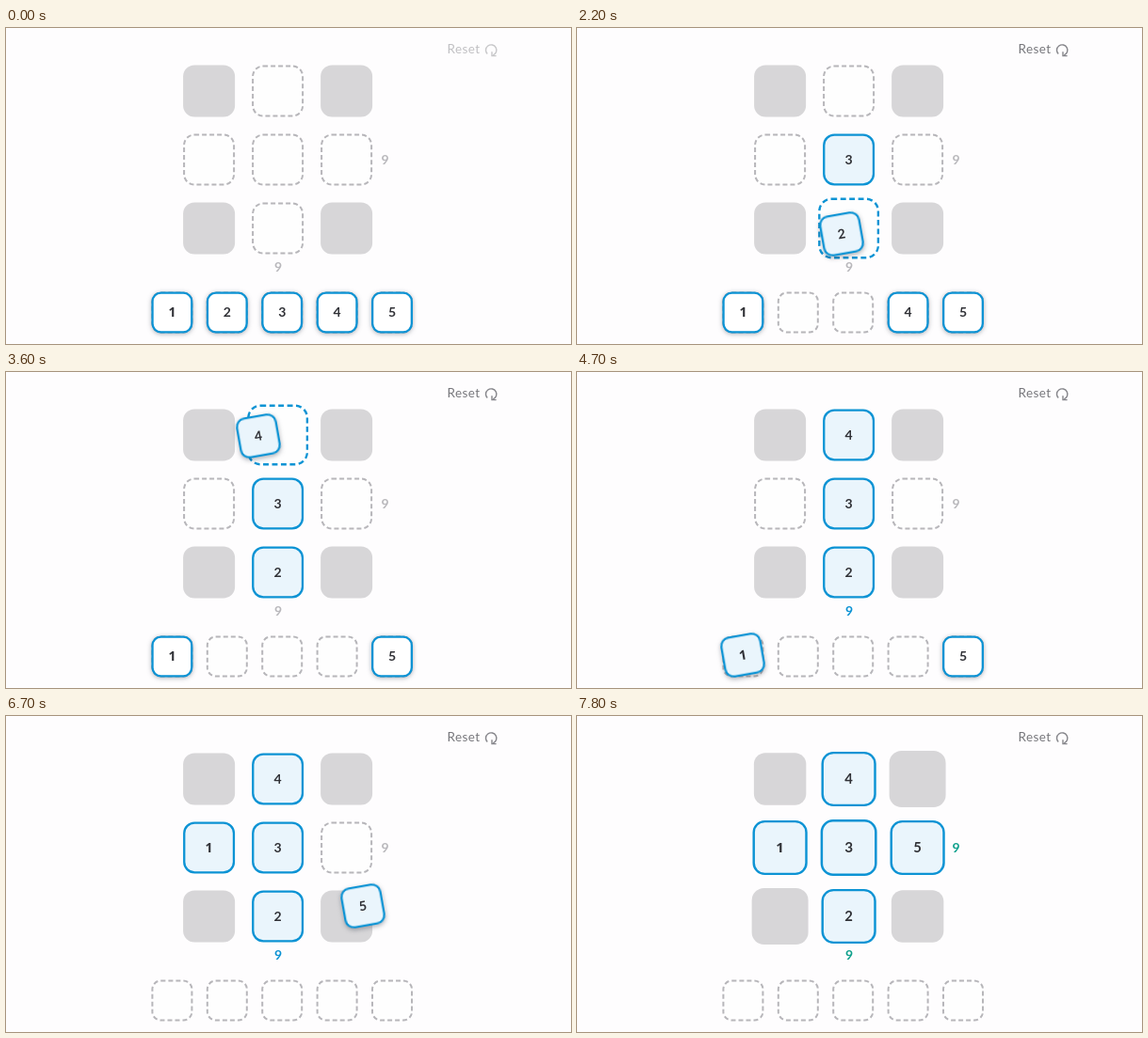
An HTML page that plays this animation: 600 px wide and 336 px high, repeating every 7.9 s.

```html
<!DOCTYPE html>
<html lang="en">
<head>
<meta charset="utf-8">
<title>Number cross puzzle</title>
<style>
  html, body { margin: 0; width: 100%; height: 100%; overflow: hidden; background: #fefdfe; }
  svg { display: block; width: 600px; height: 336px; }
  text { font: 700 14px Lato, sans-serif; text-anchor: middle; }
  .block { fill: #d7d6d8; }
  .slot { fill: #fefefe; stroke: #b7b6ba; stroke-width: 2; stroke-dasharray: 5 3; }
  .slot.hover { stroke: #0c93d4; }
  .tile rect { fill: #fff; stroke: #0c93d4; stroke-width: 2.3; }
  .tile.active rect { fill: #eaf5fc; }
  .tile text { fill: #303136; }
  .tile .one { font-family: "Open Sans", sans-serif; }
  #reset text { font-weight: 400; font-size: 13.5px; letter-spacing: .4px; text-anchor: start; fill: #77777c; }
  #reset path { fill: none; stroke: #85858a; stroke-width: 1.4; }
</style>
</head>
<body>
<svg id="stage" viewBox="0 0 600 336">
  <g id="reset">
    <text x="468.5" y="27">Reset</text>
    <path d="M511.2 27.6A5.7 5.7 0 1 1 517.2 28.9M516 25.2V29.6H520.6"/>
  </g>
</svg>
<script>
const LOOP = 7900, STEP = 100, SETTLE_TILT = -10;
const CELL = 55, TILE = 44;
const GRAY = '#b9b8bc', BLUE = '#0c93d4', GREEN = '#0fa08c';
const stage = document.getElementById('stage');
const reset = document.getElementById('reset');

// Each path point is [time, x, y]; the tile then glides to its cell from "drop" to "rest".
const moves = {
  3: { cell: 4, drop: 900, rest: 1200,
       path: [[500, 293, 301], [600, 294, 278], [700, 297, 210], [800, 297, 155], [900, 291, 145]] },
  2: { cell: 7, drop: 2400, rest: 2700,
       path: [[1700, 235, 301], [1900, 239, 285], [2100, 272, 235], [2200, 281, 219], [2400, 288, 213]] },
  4: { cell: 1, drop: 3800, rest: 4100,
       path: [[3000, 352, 301], [3100, 349, 290], [3300, 325, 205], [3500, 278, 95], [3600, 268, 68], [3800, 281, 67]] },
  1: { cell: 3, drop: 5600, rest: 6000,
       path: [[4700, 176, 301], [4900, 190, 270], [5100, 235, 195], [5300, 278, 125], [5400, 285.5, 115], [5600, 250, 130]] },
  5: { cell: 5, drop: 7000, rest: 7300,
       path: [[6300, 410, 301], [6400, 410, 297], [6500, 405, 270], [6700, 379, 202], [6800, 368, 165], [7000, 362, 142]] }
};

function add(parent, tag, attrs = {}, label) {
  const el = document.createElementNS('http://www.w3.org/2000/svg', tag);
  for (const key in attrs) el.setAttribute(key, attrs[key]);
  if (label) el.textContent = label;
  return parent.appendChild(el);
}

function sizeBox(el, size, radius) {
  const attrs = { x: -size / 2, y: -size / 2, width: size, height: size, rx: radius };
  for (const key in attrs) el.setAttribute(key, attrs[key]);
  return el;
}

const mix = (a, b, p) => a + (b - a) * p;
const clamp = p => Math.max(0, Math.min(1, p));
const place = (el, x, y, scale = 1, tilt = 0) =>
  el.setAttribute('transform', `translate(${x} ${y}) rotate(${tilt}) scale(${scale})`);

const cells = Array.from({ length: 9 }, (_, i) => {
  const col = i % 3, row = Math.floor(i / 3);
  const open = i % 2 === 1 || i === 4;
  const el = add(stage, 'rect', { class: open ? 'slot' : 'block' });
  sizeBox(el, open ? CELL - 2 : CELL, open ? 11 : 12);
  return { el, open, x: 215.6 + col * 73, y: 67 + row * 73, diagonal: col + row };
});

const rowSum = add(stage, 'text', { x: 402.5, y: 145 }, '9');
const columnSum = add(stage, 'text', { x: 289, y: 258.5 }, '9');

const trayX = n => 176.4 + (n - 1) * 58.4;
const trayY = 302.5;
for (let n = 1; n <= 5; n++) {
  place(sizeBox(add(stage, 'rect', { class: 'slot' }), TILE - 2, 9), trayX(n), trayY);
}

const tiles = [1, 2, 3, 4, 5].map(n => {
  const el = add(stage, 'g', { class: 'tile' });
  const box = add(el, 'rect');
  add(el, 'text', { y: 4.9, class: n === 1 ? 'one' : '' }, String(n));
  return { n, el, box, ...moves[n] };
});

function along(path, t) {
  let i = 1;
  while (i < path.length - 1 && t > path[i][0]) i++;
  const [t0, x0, y0] = path[i - 1], [t1, x1, y1] = path[i];
  const p = clamp((t - t0) / (t1 - t0));
  return [mix(x0, x1, p), mix(y0, y1, p)];
}

// Diagonal wave that runs over the board once it is solved.
function pulse(diagonal, t) {
  const p = clamp((t - 7350 - diagonal * 100) / 500);
  return 1 + 0.09 * Math.sin(Math.PI * p) ** 2;
}

function drawTile(tile, t) {
  const { el, box, path, drop, rest } = tile;
  const picked = t >= path[0][0];
  const target = cells[tile.cell];
  const p = 1 - (1 - clamp((t - drop) / (rest - drop))) ** 3;
  let [x, y] = picked ? along(path, t) : [trayX(tile.n), trayY];
  const dragged = picked && t < drop;
  const spot = dragged && cells.find((c, i) => c.open && Math.abs(x - c.x) < CELL / 2 &&
    Math.abs(y - c.y) < CELL / 2 && !tiles.some(o => o.cell === i && t >= o.drop));
  x = mix(x, target.x, p);
  y = mix(y, target.y, p);
  el.classList.toggle('active', picked);
  place(el, x, y, pulse(target.diagonal, t), picked ? SETTLE_TILT * (1 - p) : 0);
  sizeBox(box, mix(TILE, CELL, p) - 2.3, mix(9, 11, p));
  box.style.filter = p < 1
    ? `drop-shadow(0 ${picked ? 2 : 1.5}px 2.5px rgba(50, 55, 70, ${0.38 * (1 - p)}))` : 'none';
  if (picked && t < rest && el !== stage.lastChild) stage.appendChild(el);
  return spot;
}

function draw(t) {
  const spots = tiles.map(tile => drawTile(tile, t));
  cells.forEach((cell, i) => {
    const hover = spots.includes(cell);
    cell.el.classList.toggle('hover', hover);
    cell.el.style.display = tiles.some(o => o.cell === i && t >= o.rest) ? 'none' : '';
    place(cell.el, cell.x, cell.y, hover ? 1.18 : pulse(cell.diagonal, t));
  });
  reset.style.opacity = mix(0.45, 1, clamp((t - 400) / 200));
  const solved = t >= 7300;
  rowSum.style.fill = solved ? GREEN : GRAY;
  columnSum.style.fill = solved ? GREEN : t >= 4000 ? BLUE : GRAY;
}

// The motion advances in tenths of a second.
function tick() {
  const t = (performance.now() + 8) % LOOP;
  draw(Math.floor(t / STEP) * STEP);
  requestAnimationFrame(tick);
}
tick();
</script>
</body>
</html>
```
